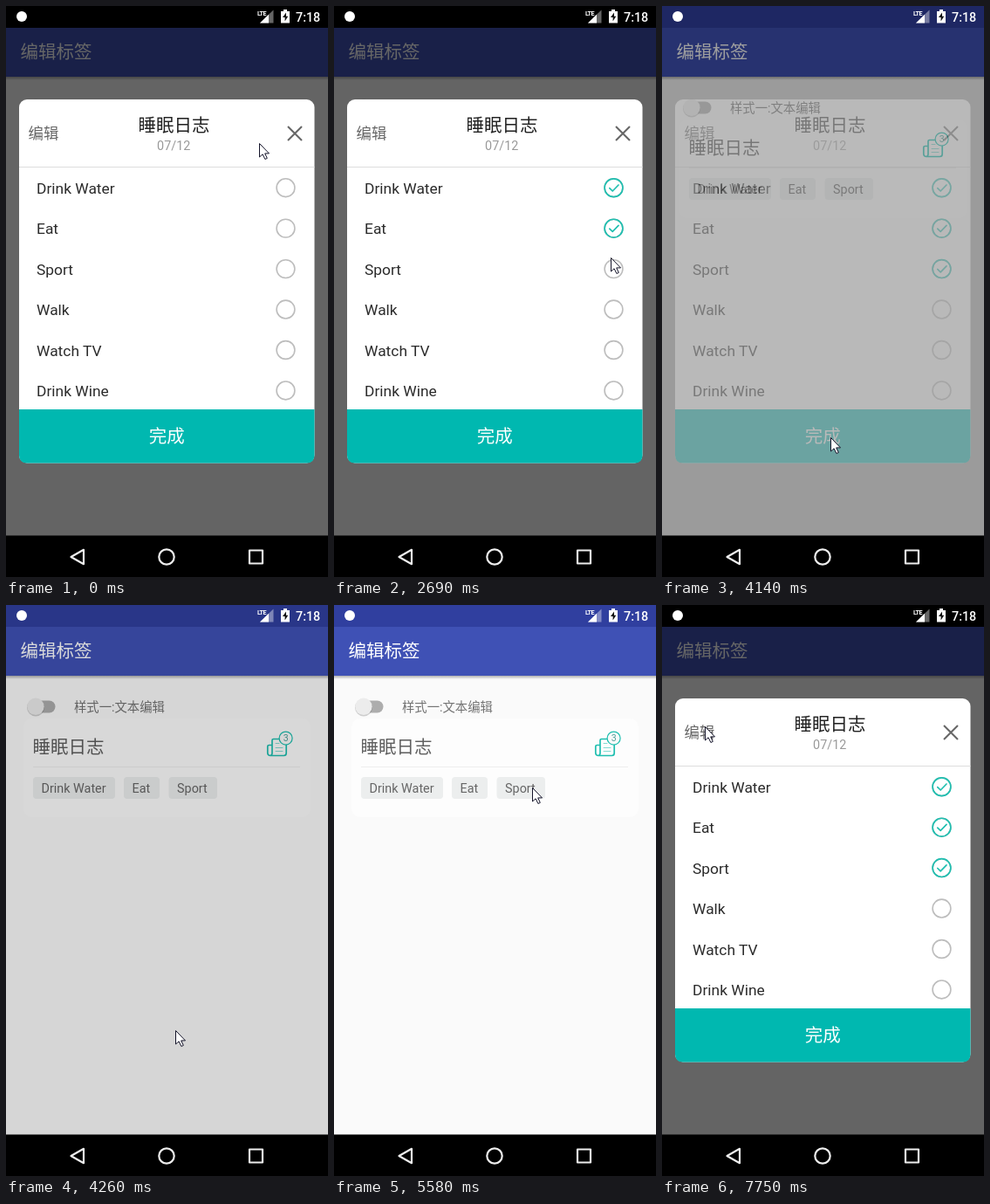
These frames come from a looping animation (369x654 px, 8 s). An HTML page:

```html
<!DOCTYPE html>
<html lang="zh-CN">
<head>
<meta charset="utf-8">
<style>
  html, body { margin: 0; width: 100%; height: 100%; overflow: hidden; background: #000; }
  svg { display: block; width: 369px; height: 654px; font-family: Roboto, "Noto Sans CJK SC", "Noto Sans CJK", sans-serif; }
  .line { fill: none; stroke-linecap: round; stroke-linejoin: round; }
  .teal { stroke: #1fbfb0; }
  .big { font-size: 20.5px; }
  .small { font-size: 14.35px; }
  .mid { text-anchor: middle; }
</style>
</head>
<body>
<svg viewBox="0 0 369 654">
  <defs>
    <linearGradient id="shade" x2="0" y2="1">
      <stop stop-opacity=".3"/><stop offset="1" stop-opacity="0"/>
    </linearGradient>
  </defs>

  <rect width="369" height="607" fill="#fafafa"/>
  <rect y="81" width="369" height="4" fill="url(#shade)"/>
  <rect width="369" height="81" fill="#3f51b5"/>
  <rect width="369" height="25" fill="#303f9f"/>
  <text class="big" x="16.4" y="60" fill="#fff">编辑标签</text>

  <rect x="28" y="109.5" width="28.5" height="14" rx="7" fill="#adadad"/>
  <circle cx="34" cy="117.5" r="10" opacity=".18"/>
  <circle cx="34" cy="116.3" r="9.7" fill="#ececec"/>
  <text class="small" x="78" y="121.5" fill="#737373">样式一:文本编辑</text>

  <rect x="20" y="130" width="329" height="113" rx="10" fill="#fdfdfd"/>
  <text class="big" x="30.5" y="170" fill="#5f5f5f">睡眠日志</text>
  <path d="M31 185.5H337" stroke="#eee"/>
  <g class="line teal" stroke-width="1.7">
    <path d="M305 160.5H301.5Q299.8 160.5 299.8 162V169.5Q300 172.5 303 172.5H318.5Q321.2 172.5 321.2 169.5V153.5H306.5Q305 153.5 305 155V169.5Q305 172 303 172.5"/>
    <path d="M309 158.5H313M309 163.5H317M309 167.5H317" stroke-width="1" opacity=".55"/>
    <circle cx="320.6" cy="152.6" r="7.5" fill="#fafafa" stroke-width="1.2"/>
  </g>
  <text class="mid" x="320.6" y="156.4" font-size="10.5" fill="#4d9f98">3</text>
  <g id="tags" class="small" fill="#666"></g>

  <rect id="dim" width="369" height="607"/>
  <rect id="statusDark" width="369" height="25"/>

  <g fill="#fff">
    <circle cx="18" cy="12" r="6"/>
    <path d="M291 19.5H306.5V4.5Z" opacity=".4"/>
    <path d="M291 19.5H301V9.8Z"/>
    <text x="288" y="11" font-size="7.2" font-weight="700" letter-spacing="-.6">LTE</text>
    <path d="M315 6H318V4H322V6H325V19.5H315Z"/>
    <path d="M321 7.5L317 13H319.6V17.5L323.3 11.8H321Z" fill="#111"/>
    <text class="small" x="332" y="17.5" font-weight="500">7:18</text>
  </g>

  <g id="dialog">
    <rect x="15" y="107" width="338.5" height="416.5" rx="9" fill="#fff"/>
    <text x="25.5" y="152" font-size="17.4" fill="#666">编辑</text>
    <text class="big mid" x="192.5" y="143.5" fill="#222">睡眠日志</text>
    <text class="small mid" x="192.2" y="165" fill="#999">07/12</text>
    <path d="M323 138L339 154M339 138L323 154" stroke="#666" stroke-width="2"/>
    <path d="M15 184.5H353.5" stroke="#ddd"/>
    <g id="items" font-size="17.4" fill="#2b2b2b"></g>
    <path d="M15 462H353.5V514.5Q353.5 523.5 344.5 523.5H24Q15 523.5 15 514.5Z" fill="#00b8b0"/>
    <text class="big mid" x="184.3" y="500" fill="#fff">完成</text>
  </g>

  <rect y="606.5" width="369" height="48"/>
  <g class="line" stroke="#eee" stroke-width="2.2">
    <path d="M74.5 631L89 622.8V639.2Z"/>
    <circle cx="184" cy="631" r="8.7"/>
    <rect x="279" y="623.5" width="15" height="15"/>
  </g>

  <path id="cursor" d="M.5 .5V16L4.1 12.8L6.9 18.5L9.3 17.4L6.7 11.9H11.5Z" fill="#fff" stroke="#14142a"/>
</svg>

<script>
const LOOP = 8000;
const CLOSE = 4140, STATUS_DARK = 6370, REOPEN = 6670;
const checkTimes = [1340, 2290, 3110];
const items = ["Drink Water", "Eat", "Sport", "Walk", "Watch TV", "Drink Wine"];
const $ = id => document.getElementById(id);

// Pointer samples: time, x, y; each is held until the next.
const pointer = [
  [0, 290, 157], [460, 287, 160], [580, 271, 178], [700, 277, 190], [820, 294, 200], [940, 309, 208],
  [1090, 314, 209], [1460, 312, 227], [1610, 314, 245], [1730, 316, 258], [2040, 316, 255],
  [2570, 317, 272], [2690, 317, 288], [2840, 318, 295], [2960, 319, 300], [3230, 316, 340],
  [3350, 308, 384], [3500, 255, 442], [3620, 203, 495], [3770, 193, 494], [4260, 194, 487],
  [4410, 195, 435], [4530, 197, 355], [4650, 198, 285], [4770, 198, 237], [4920, 160, 222],
  [5040, 125, 212], [5160, 96, 208], [5310, 69, 209], [5430, 139, 209], [5580, 227, 209],
  [5700, 290, 197], [5850, 333, 169], [6000, 325, 164], [6120, 316, 160], [6670, 306, 172],
  [6820, 255, 205], [6940, 215, 226], [7090, 225, 224], [7210, 247, 222], [7360, 190, 199],
  [7480, 105, 162], [7600, 50, 139], [7750, 49, 139]
];
const dimSteps = [[0, .6], [CLOSE, .38], [4260, .145], [4410, 0], [REOPEN, .6]];
const dialogSteps = [[0, 1], [CLOSE, .3], [4260, 0], [REOPEN, 1]];

const held = (steps, t) => steps.findLast(step => step[0] <= t);

$("tags").innerHTML = [[31, 94], [135, 41], [186.5, 55.5]].map(([x, w], i) => `
  <rect x="${x}" y="197" width="${w}" height="25" rx="4" fill="#eceeee"/>
  <text x="${x + 9.6}" y="215">${items[i]}</text>`).join("");

$("items").innerHTML = items.map((name, i) => `
  <g transform="translate(0 ${i * 46.45})">
    <text x="35" y="215">${name}</text>
    <circle class="line" cx="320.5" cy="208.2" r="10.4" stroke="#bdbdbd" stroke-width="1.6"/>
    <g class="check line teal" stroke-width="1.7">
      <circle cx="320.5" cy="208.2" r="10.4"/>
      <path d="M315.8 208.6L319.2 212L326 205"/>
    </g>
  </g>`).join("");
const checks = document.querySelectorAll(".check");

function draw() {
  const t = performance.now() % LOOP;
  const [, x, y] = held(pointer, t);
  $("cursor").setAttribute("transform", `translate(${x} ${y})`);
  $("dim").setAttribute("opacity", held(dimSteps, t)[1]);
  $("dialog").setAttribute("opacity", held(dialogSteps, t)[1]);
  $("statusDark").setAttribute("opacity", +(t < CLOSE || t >= STATUS_DARK));
  checks.forEach((check, i) => check.setAttribute("opacity", +(t >= checkTimes[i])));
  requestAnimationFrame(draw);
}
draw();
</script>
</body>
</html>
```
